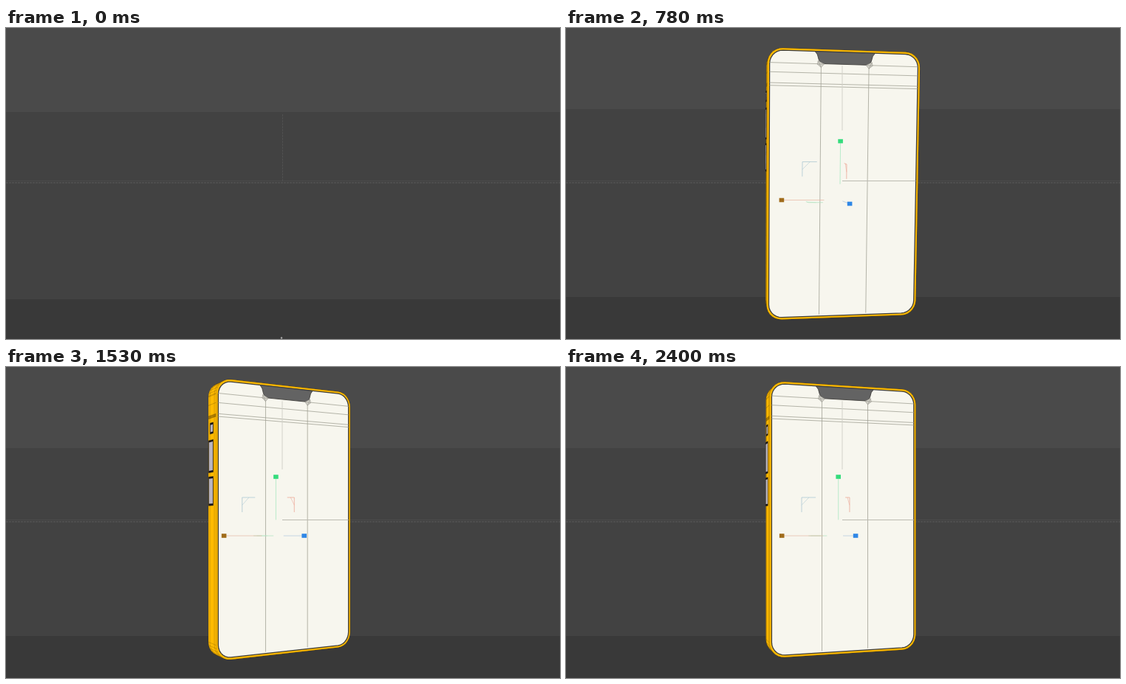
Animation of 750 by 422 pixels, one loop 2430 ms. Source, as an HTML page:

```html
<!DOCTYPE html>
<html lang="en">
<head>
<meta charset="utf-8">
<title>Turning phone model</title>
<style>
html, body { margin: 0; width: 100%; height: 100%; overflow: hidden; background: #424242; }
svg { display: block; width: 100vw; height: 100vh; }
</style>
</head>
<body>
<svg viewBox="0 0 750 422" preserveAspectRatio="none">
  <rect width="750" height="422" fill="#424242"/>
  <g id="bands"></g>
  <path d="M0 207.5H750" stroke="#4b4b4b"/>
  <path d="M0 210H750" stroke="#5b5b5b" stroke-dasharray="3 1"/>
  <path d="M374.5 117V210" stroke="#505050" stroke-dasharray="3 1"/>
  <g id="scene" stroke-linejoin="round"></g>
</svg>
<script>
const LOOP = 2430, STEP = 30;
const W = 102, H = 179, D = 13;   // half sizes of the body
const CX = 374, CY = 207, DIST = 880;
const GOLD = '#ffbb02', PALE = '#fddf88', PAPER = '#f7f6ee';
const THIN = 'rgba(70,48,0,.38)', MESH = '#a3a296';
const RINGS = [160, 148, 134, 130.5];

// keys: time, value, slope per ms
const YAW = [[0, -255, .62], [270, -114, .42], [540, -20.5, .19], [1050, 21.5, .03],
  [1530, 28.6, 0], [1950, 23.5, -.014], [2400, 17, -.014]];
const LEAN = [[0, 22, -.018], [270, 16.7, -.028], [540, 8.3, -.022], [1050, .8, -.004], [1530, 0, 0]];
const DROP = [[0, 400, -2.1], [270, 84, -.42], [540, 24, -.11], [1050, 0, 0]];

const bands = document.getElementById('bands');
const scene = document.getElementById('scene');
let sy, cy, sl, cl, drop, out;

function track(keys, t) {
  let i = 0;
  while (i < keys.length - 1 && t >= keys[i + 1][0]) i++;
  const [t0, a, m] = keys[i];
  if (i === keys.length - 1) return a + m * (t - t0);
  const [t1, b, n] = keys[i + 1], span = t1 - t0, u = (t - t0) / span, v = 1 - u;
  return a * (1 + 2 * u) * v * v + m * span * u * v * v +
    b * u * u * (3 - 2 * u) - n * span * u * u * v;
}

function turn(x, y, z) {
  const y1 = y * cl - z * sl, z1 = z * cl + y * sl;
  return [x * cy + z1 * sy, y1, z1 * cy - x * sy];
}

function project(x, y, z) {
  const [a, b, c] = turn(x, y, z), s = DIST / (DIST - c);
  return [CX + a * s, CY - (b - drop) * s];
}

const at = (pts, z) => pts.map(p => project(p[0], p[1], z));
const line = pts => 'M' + pts.map(p => p[0].toFixed(2) + ' ' + p[1].toFixed(2)).join('L');

function draw(d, fill, stroke, width = .8, extra = '') {
  out += `<path d="${d}" fill="${fill || 'none'}" stroke="${stroke || 'none'}" stroke-width="${width}" ${extra}/>`;
}
const shape = (pts, fill, stroke, width) => draw(line(pts) + 'Z', fill, stroke, width);

// counter-clockwise outlines facing the viewer have a negative area on screen
function faces(pts) {
  let a = 0;
  pts.forEach((p, i) => {
    const q = pts[(i + 1) % pts.length];
    a += p[0] * q[1] - q[0] * p[1];
  });
  return a < 0;
}

function rounded(x, y, w, h, r, n = 7) {
  const pts = [];
  for (let c = 0; c < 4; c++) {
    const sx = c === 0 || c === 3 ? 1 : -1, sv = c < 2 ? 1 : -1;
    for (let k = 0; k <= n; k++) {
      const a = (c + k / n) * Math.PI / 2;
      pts.push([x + sx * (w - r) + r * Math.cos(a), y + sv * (h - r) + r * Math.sin(a)]);
    }
  }
  return pts;
}
const circle = (x, y, r) => rounded(x, y, r, r, r);

function hull(pts) {
  const p = [...pts].sort((a, b) => a[0] - b[0] || a[1] - b[1]);
  const half = list => {
    const h = [];
    for (const q of list) {
      while (h.length > 1) {
        const a = h[h.length - 2], b = h[h.length - 1];
        if ((b[0] - a[0]) * (q[1] - a[1]) - (b[1] - a[1]) * (q[0] - a[0]) > 0) break;
        h.pop();
      }
      h.push(q);
    }
    return h.slice(0, -1);
  };
  return [...half(p), ...half(p.reverse())];
}

const INSET = 2.8;
const BODY = rounded(0, 0, W, H, 20);
const PANEL = rounded(0, 0, W - INSET, H - INSET, 17.5);
const CAMERA = rounded(46, 122, 47, 47, 21);
const LENSES = [[61, 145], [60, 98], [17, 122]];
const FLASHES = [[17, 153], [13, 88]];
const NOTCH_HALF = [[40, 176], [37, 172], [35, 165], [32.5, 161.7], [28, 160.3]];
const NOTCH = [...NOTCH_HALF, ...NOTCH_HALF.map(p => [-p[0], p[1]]).reverse()];

function sideSeen(s) {
  const q = [[-100, D], [-100, -D], [100, -D], [100, D]].map(p => project(s * W, p[0], p[1]));
  return faces(s > 0 ? q : q.reverse());
}

function sides(front, back) {
  let cross = '', along = '';
  const mid = [-8, 7].map(z => at(BODY, z));
  BODY.forEach((p, i) => {
    const j = (i + 1) % BODY.length;
    if (!faces([front[j], front[i], back[i], back[j]])) return;
    cross += line([front[i], back[i]]);
    for (const m of mid) along += line([m[i], m[j]]);
  });
  draw(cross + along, '', THIN, .6);
  for (const s of [-1, 1]) {
    if (!sideSeen(s)) continue;
    const edge = (v, z) => project(s * W, v, z);
    draw(RINGS.map(v => line([edge(v, D), edge(v, -D)])).join(''), '', THIN, .7);
    shape([edge(134, D), edge(134, -D), edge(130.5, -D), edge(130.5, D)], 'rgba(60,40,0,.4)');
    if (s < 0) {
      button(124, 110, -5, 5);
      button(102, 60.5, -10, 5);
      button(55, 18, -10, 5);
    }
  }
}

function button(top, low, z0, z1) {
  const box = (a, b, c, d) => [[a, c], [a, d], [b, d], [b, c]].map(p => project(-W - .8, p[0], p[1]));
  shape(box(top, low, z0, z1), '#17151a', '#17151a', .5);
  shape(box(top - 2.4, low + 2.4, z0 + 1, z1 - 1.3), '#b9b5c0');
}

function frontFace(front) {
  const on = (x, y) => project(x, y, D), e = W - INSET;
  shape(front, GOLD, THIN, .6);
  shape(at(PANEL, D), PAPER, '#403f3c', 1.3);
  let grid = '';
  for (const v of RINGS.slice(1)) grid += line([on(-e, v), on(e, v)]);
  for (const s of [-1, 1]) {
    grid += line([on(s * 32, RINGS[0]), on(s * e, RINGS[0])]);
    grid += line([on(s * 32, RINGS[0]), on(s * 32, -e * H / W)]);
  }
  draw(grid, '', MESH, .8);
  shape(at(NOTCH, D), '#636363', '#403f3c', .9);
  for (const s of [-1, 1]) {
    const patch = [[36, 164], [28, 160], [32, 155.5], [37, 159.5]].map(p => on(s * p[0], p[1]));
    shape(patch, '#d2d1c8', '#8a8980', .5);
    draw(line([patch[0], patch[2]]) + line([patch[1], patch[3]]), '', '#8a8980', .5);
  }
  const top = on(0, 158.5)[1];
  if (top < 139) draw(`M374 ${top.toFixed(1)}V139`, '', '#d3d2c9', 1);
  if (sy > 0) draw(`M374 207.5H${on(e, 0)[0].toFixed(1)}`, '', '#bbbab1', 1);
  else if (on(-e, 0)[0] < 340) draw(`M${on(-e, 0)[0].toFixed(1)} 207.5H340`, '', '#bbbab1', 1);
}

function backFace(back) {
  const on = (x, y) => project(x, y, -D);
  shape(back, GOLD, THIN, .7);
  draw(RINGS.map(v => line([on(-W, v), on(W, v)])).join(''), '', THIN, .7);
  shape(at(CAMERA, -D), PALE, '#5a4a1c', .9);
  for (const [x, y] of FLASHES) shape(at(circle(x, y, 6.5), -D), '#17130c', '#6b5a2a', .6);
  for (const [x, y] of LENSES) {
    const rim = at(circle(x, y, 20), -D - 5);
    shape(hull([...at(circle(x, y, 20), -D), ...rim]), '#94691a', '#3a2a08', .9);
    shape(rim, '#b07c1c', '#3a2a08', .7);
    shape(at(circle(x, y, 16.5), -D - 5), '#47474c', '#1e1c1a', 1);
    shape(at(circle(x, y, 8), -D - 5), '#0c0c0d', '#222', 1.5);
  }
  shape(at(circle(-8, -28, 22), -D), PALE, '#8a7430', .7);
}

function gizmo(isFront) {
  const o = turn(0, -22, -18), L = 80;
  const spot = (x, y, z) => {
    const d = turn(-x * L, y * L, z * L);
    return [CX + o[0] + d[0], CY + drop - o[1] - d[1]];
  };
  const X = [1, 0, 0], Y = [0, 1, 0], Z = [0, 0, 1];
  const mix = (a, b, p, q) => spot(...a.map((n, i) => n * p + b[i] * q));
  const fade = `opacity="${isFront ? .75 : .3}"`;
  const corner = (a, b, color) => {
    const p = mix(a, b, .65, .4), q = mix(a, b, .65, .65), r = mix(a, b, .4, .65);
    draw(line([p, q, r]), '', color, 1, fade);
    draw(line([mix(a, b, .65, .52), mix(a, b, .52, .65)]), '', color, .7, fade);
  };
  corner(X, Y, '#a9c6d2');
  corner(Z, Y, '#eba392');
  corner(X, Z, '#b0e3c0');
  for (const [axis, color, pale] of [[X, '#a06c1b', '#e6b9a6'], [Y, '#34dc7c', '#a4e9bf'], [Z, '#2f87e6', '#b3c9dd']]) {
    const tip = spot(...axis);
    draw(line([mix(axis, axis, .15, .12), tip]), '', isFront ? pale : '#7d6a1c', 1, fade);
    out += `<rect x="${(tip[0] - 3.3).toFixed(1)}" y="${(tip[1] - 2.8).toFixed(1)}" width="6.6" height="5.6" fill="${color}"/>`;
  }
}

function backdrop(t) {
  const left = t < 570 ? [114, 368] : [110, 365], right = t < 30 ? [114, 368] : [110, 365];
  const band = (x, y, w, h, c) => `<rect x="${x}" y="${y}" width="${w}" height="${h}" fill="${c}"/>`;
  bands.innerHTML = band(0, 0, 375, left[0], '#4a4a4a') + band(375, 0, 375, right[0], '#4a4a4a') +
    band(0, left[1], 470, 422 - left[1], '#393939') + band(470, right[1], 280, 422 - right[1], '#393939');
}

function render(t) {
  const yaw = track(YAW, t) * Math.PI / 180, lean = track(LEAN, t) * Math.PI / 180;
  sy = Math.sin(yaw); cy = Math.cos(yaw);
  sl = Math.sin(lean); cl = Math.cos(lean);
  drop = track(DROP, t);
  out = '';
  backdrop(t);
  if (t < STEP) {
    out = '<circle cx="373" cy="420.5" r="1.2" fill="#a8a8a8"/>';
  } else {
    const front = at(BODY, D), back = at(BODY, -D), isFront = faces(front);
    shape(hull([...front, ...back]), GOLD, THIN, .6);
    sides(front, back);
    if (isFront) frontFace(front);
    else if (faces([...back].reverse())) backFace(back);
    gizmo(isFront);
  }
  scene.innerHTML = out;
}

let last = -1;
function tick() {
  const t = Math.floor(performance.now() % LOOP / STEP) * STEP;
  if (t !== last) render(last = t);
  requestAnimationFrame(tick);
}
tick();
</script>
</body>
</html>
```
